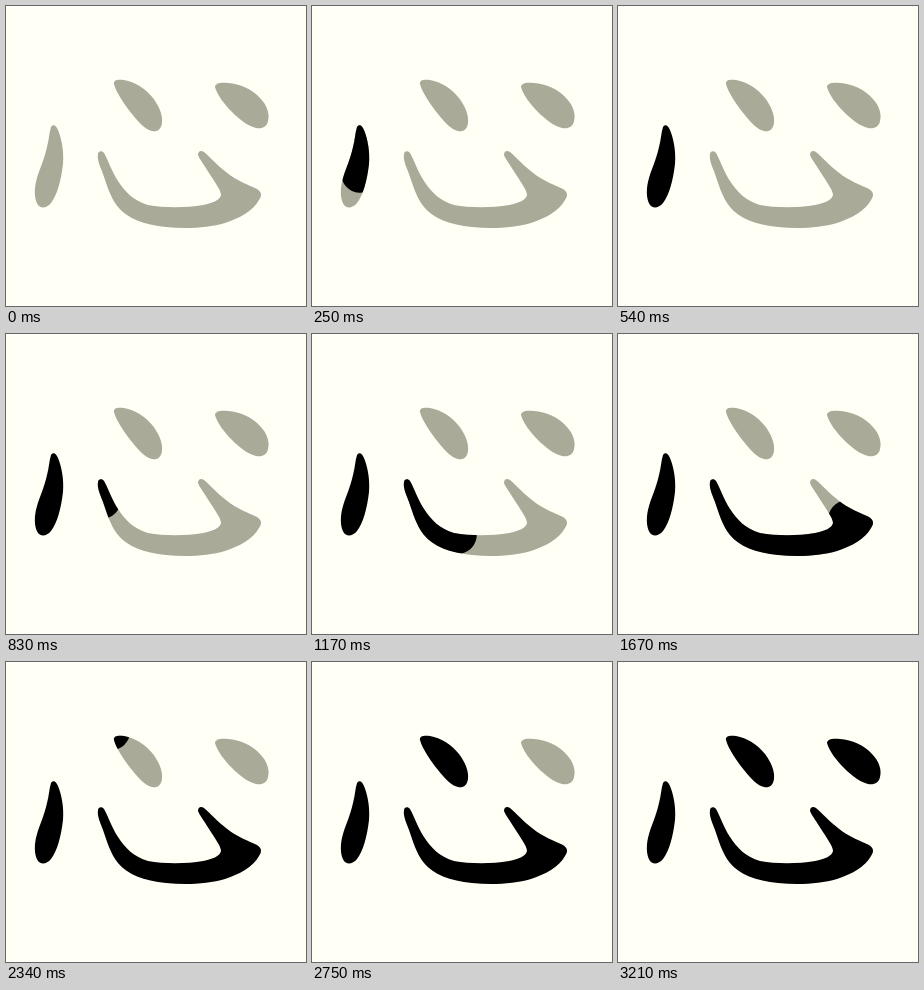
An HTML page with a canvas for the animation above (3.25 s loop, 300 px wide and 300 px high).

```html
<!DOCTYPE html>
<html lang="en">
<head>
<meta charset="utf-8">
<title>Stroke order</title>
<style>
  html, body { margin: 0; width: 100%; height: 100%; overflow: hidden; background: #fffff5; }
  canvas { display: block; width: 300px; height: 300px; }
</style>
</head>
<body>
<canvas id="stage" width="300" height="300"></canvas>
<script>
const LOOP = 3250;
const PAPER = '#fffff5', PALE = '#aaaa98', INK = '#000';
const BRUSH = 37.5;

// Each stroke: its outline and the brush path as [x, y, time in ms].
const strokes = [
  {
    shape: `M45,121 C47,118 50,119 52,124 C56,134 58,146 57,158 C55,175 51,189 45,197
      C41,202 35,203 32,199 C28,193 28,182 31,172 C34,162 38,154 41,141 C43,134 43,127 45,121Z`,
    path: [[51, 110, 20], [48, 168, 250], [40, 190, 380]]
  },
  {
    shape: `M92,148 C92,145 96,144 98,147 C102,154 106,166 112,175 C119,186 128,195 142,199
      C158,202 180,202 197,199 C207,197 214,194 215,189 C215,184 208,175 203,167
      C199,160 194,154 192,149 C192,145 195,144 198,146 C204,151 211,159 220,166
      C231,175 243,179 251,183 C256,186 256,190 253,194 C247,205 234,212 219,217
      C202,222 180,223 160,221 C138,219 121,212 112,201 C104,191 101,179 97,168
      C94,160 91,154 92,148Z`,
    path: [[90, 138, 650], [96, 166, 830], [114, 187, 980], [128, 197, 1070],
      [146, 201, 1170], [180, 209, 1340], [215, 206, 1500], [237, 192, 1620],
      [229, 185, 1670], [210, 166, 1800], [195, 147, 1920]]
  },
  {
    shape: `M108,78 C107,74 112,73 118,74 C129,76 139,82 147,92 C153,100 157,109 156,117
      C155,124 151,126 146,125 C140,124 133,117 126,108 C118,98 110,86 108,78Z`,
    path: [[104, 68, 2330], [150, 118, 2680]]
  },
  {
    shape: `M209,81 C209,77 215,76 222,77 C234,78 246,83 254,92 C261,99 264,108 262,115
      C261,121 256,123 250,122 C242,120 234,114 226,106 C219,99 211,89 209,81Z`,
    path: [[206, 70, 2880], [256, 114, 3200]]
  }
];
for (const s of strokes) s.shape = new Path2D(s.shape);

const ctx = document.getElementById('stage').getContext('2d');
ctx.lineWidth = BRUSH;
ctx.lineCap = ctx.lineJoin = 'round';

// Uneven ticks: one long and four short holds in every 250 ms.
function snap(t) {
  const late = t >= 2340;
  const hold = late ? 80 : 90;
  const phase = (t - (late ? 2340 : 80) + 250) % 250;
  return t - phase + (phase < hold ? 0 : hold + 40 * Math.min(3, Math.floor((phase - hold) / 40)));
}

function paint({ shape, path }, t) {
  ctx.fillStyle = t >= path[path.length - 1][2] ? INK : PALE;
  ctx.fill(shape);
  if (t < path[0][2] || ctx.fillStyle === '#000000') return;
  ctx.save();
  ctx.clip(shape);
  ctx.strokeStyle = INK;
  ctx.beginPath();
  ctx.moveTo(path[0][0], path[0][1]);
  for (let i = 1; i < path.length; i++) {
    const [x0, y0, t0] = path[i - 1], [x1, y1, t1] = path[i];
    const k = Math.min(1, (t - t0) / (t1 - t0));
    ctx.lineTo(x0 + (x1 - x0) * k, y0 + (y1 - y0) * k);
    if (k < 1) break;
  }
  ctx.stroke();
  ctx.restore();
}

function draw(time) {
  const t = snap(time % LOOP);
  ctx.fillStyle = PAPER;
  ctx.fillRect(0, 0, 300, 300);
  for (const s of strokes) paint(s, t);
}

const start = performance.now();
function tick() {
  draw(performance.now() - start);
  requestAnimationFrame(tick);
}
tick();
</script>
</body>
</html>
```
